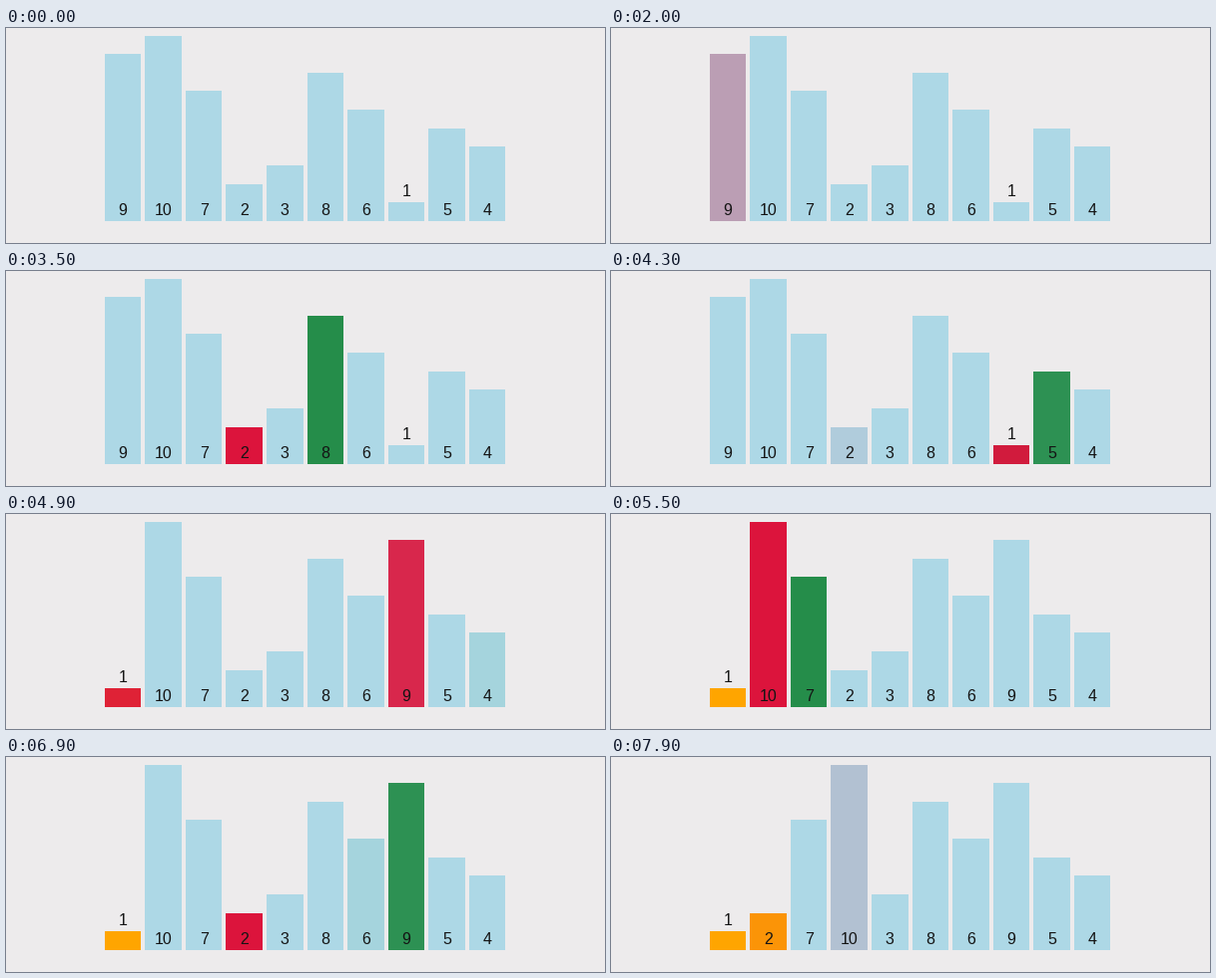
Recreate the animation shown at these times as a matplotlib script. Size 600 by 216 pixels, loop 8000 ms.

```python
import numpy as np
import matplotlib.pyplot as plt
from matplotlib.animation import FuncAnimation
from matplotlib.colors import to_rgb
from matplotlib.patches import Rectangle

W, H, DPI = 600, 216, 100
FRAMES, INTERVAL = 80, 100
START = [9, 10, 7, 2, 3, 8, 6, 1, 5, 4]
N = len(START)

LEFT, PITCH, BAR_W = 98.8, 40.56, 36.5
BASE, UNIT = 194, 18.65

BG = "#edebec"
IDLE, BEST, PROBE, DONE = (
    np.array(to_rgb(c)) for c in ("lightblue", "crimson", "#258d4a", "orange"))

STEP, FADE = 300, 200            # ms per comparison, ms per colour change
PASSES = [1960, 5160]            # when each pass marks its first bar
LEAD, SWAP_WAIT = 100, 120


def ease(x):
    """CSS 'ease', cubic-bezier(.25, .1, .25, 1)."""
    x = min(max(x, 0.0), 1.0)
    s = np.linspace(0, 1, 101)
    bx = 0.75 * s * (1 - s) ** 2 + 0.75 * s ** 2 * (1 - s) + s ** 3
    by = 0.3 * s * (1 - s) ** 2 + 3 * s ** 2 * (1 - s) + s ** 3
    return np.interp(x, bx, by)


def selection_sort():
    """Return colour changes per slot and the value order after each swap."""
    changes = [[] for _ in START]
    values = list(START)
    orders = [(0, list(values))]
    for i, t in enumerate(PASSES):
        best = i
        changes[i].append((t, BEST, None))
        t += LEAD
        for j in range(i + 1, N):
            changes[j].append((t, PROBE, None))
            t += STEP
            if values[j] < values[best]:
                changes[best].append((t, IDLE, None))
                changes[j].append((t, BEST, None))
                best = j
            else:
                changes[j].append((t, IDLE, None))
        t += SWAP_WAIT
        values[i], values[best] = values[best], values[i]
        orders.append((t, list(values)))
        changes[best].append((t, IDLE, None))
        changes[i].append((t, DONE, BEST))   # the red travels with the bar
    return changes, orders


changes, orders = selection_sort()


def color_at(slot, t):
    src, dst, t0 = IDLE, IDLE, 0
    for when, color, jump in changes[slot]:
        if when > t:
            break
        if jump is None:
            src = src + (dst - src) * ease((when - t0) / FADE)
        else:
            src = jump
        dst, t0 = color, when
    return src + (dst - src) * ease((t - t0) / FADE)


fig = plt.figure(figsize=(W / DPI, H / DPI), dpi=DPI, facecolor=BG)
ax = fig.add_axes([0, 0, 1, 1])
ax.set_xlim(0, W)
ax.set_ylim(H, 0)
ax.axis("off")

bars, labels = [], []
for k in range(N):
    x = LEFT + k * PITCH
    bars.append(ax.add_patch(Rectangle((x, BASE), BAR_W, 0, lw=0)))
    labels.append(ax.text(x + BAR_W / 2, 188, "", ha="center", va="baseline",
                          family="Liberation Sans", size=16 * 72 / DPI,
                          color="#141414"))


def draw(frame):
    t = frame * INTERVAL
    values = [order for when, order in orders if when <= t][-1]
    for k, (bar, label, v) in enumerate(zip(bars, labels, values)):
        bar.set_y(BASE - v * UNIT)
        bar.set_height(v * UNIT)
        bar.set_facecolor(color_at(k, t))
        label.set_text(str(v))
        label.set_y(169 if v == 1 else 188)   # too short to hold its number
    return bars + labels


anim = FuncAnimation(fig, draw, frames=FRAMES, interval=INTERVAL,
                     repeat=True, repeat_delay=0)
plt.show()
```
